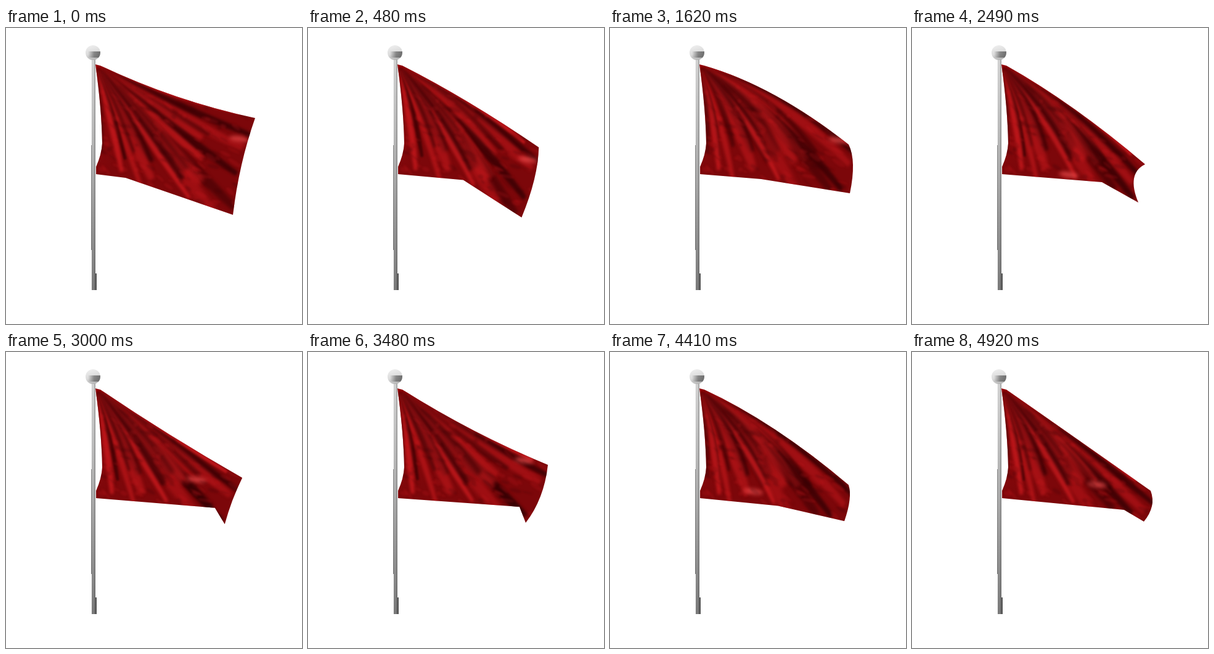
Animation of 480 by 480 pixels, one loop 4.95 s. Source, as an HTML page with a canvas:

```html
<!DOCTYPE html>
<html lang="en">
<head>
<meta charset="utf-8">
<title>Waving flag</title>
<style>
  html, body { margin: 0; width: 100%; height: 100%; overflow: hidden; background: #fff; }
  canvas { display: block; width: 480px; height: 480px; }
</style>
</head>
<body>
<canvas id="stage" width="480" height="480"></canvas>
<script>
const SIZE = 480, LOOP = 4950, STEP = 30;
const ctx = document.getElementById('stage').getContext('2d');

// The cloth hangs from two fixed points; each pose places its free corners.
const TOP = [145, 59], BOTTOM = [146, 237];
const poses = [];
const pose = (time, bow, tip, mid, foot, heel, glint) =>
  poses.push({ time, values: [bow, ...tip, ...mid, ...foot, ...heel, ...glint] });

pose(0, -8, [404, 146], [382, 222], [368, 303], [194, 243], [378, 180]);
pose(960, 18, [353, 224], [357, 262], [339, 308], [292, 246], [340, 234]);
pose(1620, 15, [387, 189], [394, 222], [389, 268], [245, 245], [370, 182]);
pose(2490, 9, [378, 221], [360, 244], [367, 283], [308, 250], [254, 238]);
pose(3480, -6, [389, 183], [377, 234], [353, 277], [343, 251], [350, 176]);
pose(3930, 15, [384, 203], [388, 236], [381, 273], [230, 243], [202, 230]);
pose(4920, 1, [387, 225], [389, 250], [376, 275], [344, 256], [300, 215]);

const mix = (a, b, k) => a + (b - a) * k;
const lerp = (p, q, k) => [mix(p[0], q[0], k), mix(p[1], q[1], k)];
const distance = (p, q) => Math.hypot(q[0] - p[0], q[1] - p[1]);

function random(seed) {
  return () => (seed = seed * 16807 % 2147483647) / 2147483647;
}

// Hermite blend of the poses, with a small flutter between them.
function shapeAt(t) {
  const at = k => poses[Math.max(0, Math.min(poses.length - 1, k))];
  let i = 0;
  while (i < poses.length - 2 && t >= poses[i + 1].time) i++;
  const p = at(i), q = at(i + 1), span = q.time - p.time;
  const w = Math.min(1, (t - p.time) / span), ease = w * w * (3 - 2 * w);
  const slope = (k, n) =>
    (at(k + 1).values[n] - at(k - 1).values[n]) / (at(k + 1).time - at(k - 1).time);
  const v = p.values.map((a, n) => mix(a, q.values[n], ease)
    + span * w * (1 - w) * (slope(i, n) * (1 - w) - slope(i + 1, n) * w)
    + 2 * Math.sin(Math.PI * w) * Math.sin(t / 130 - n));
  const point = n => [v[n], v[n + 1]];
  return { bow: v[0], tip: point(1), mid: point(3), foot: point(5), heel: point(7), glint: point(9) };
}

function clothPath({ bow, tip, mid, foot, heel }) {
  const path = new Path2D();
  const curve = (c, p) => path.quadraticCurveTo(...c, ...p);
  const crown = lerp(TOP, tip, .5), fly = lerp(tip, foot, .5);
  path.moveTo(...TOP);
  path.lineTo(TOP[0] + 8, TOP[1] + 2);
  curve([crown[0], crown[1] - 2 * bow], tip);
  curve([2 * mid[0] - fly[0], 2 * mid[1] - fly[1]], foot);
  path.lineTo(...heel);
  path.lineTo(...BOTTOM);
  path.lineTo(146, 225);
  curve([155, 205], [156, 187]);
  curve([155, 130], TOP);
  path.closePath();
  return path;
}

// Point a fraction s of the way round the free edge, from tip to hoist.
function rimPoint({ tip, mid, foot, heel }, s) {
  const rim = [tip, mid, foot, heel, BOTTOM];
  const legs = rim.slice(1).map((p, k) => distance(rim[k], p));
  let left = s * legs.reduce((a, b) => a + b), k = 0;
  while (k < legs.length - 1 && left > legs[k]) left -= legs[k++];
  return lerp(rim[k], rim[k + 1], left / legs[k]);
}

// A curved spindle, thin at its root.
function drawFold(from, to, width, bow, color) {
  const len = distance(from, to) || 1;
  const nx = (to[1] - from[1]) / len, ny = (from[0] - to[0]) / len;
  const left = [], right = [];
  for (let n = 0; n <= 12; n++) {
    const k = n / 12, [x, y] = lerp(from, to, k);
    const lift = 4 * bow * k * (1 - k);
    const half = width / 2 * Math.sin(Math.PI * (.06 + .74 * k));
    left.push([x + nx * (lift + half), y + ny * (lift + half)]);
    right.unshift([x + nx * (lift - half), y + ny * (lift - half)]);
  }
  ctx.fillStyle = color;
  ctx.beginPath();
  [...left, ...right].forEach(p => ctx.lineTo(...p));
  ctx.fill();
}

const light = a => `rgba(200,26,30,${a})`;
const dark = a => `rgba(48,0,3,${a})`;

// Creases fan out from the upper hoist, light and dark in turn, and sway.
function drawFolds(shape, t) {
  const rnd = random(4), count = 20;
  for (let n = 0; n < count; n++) {
    const sway = .02 * Math.sin(t / 400 + n);
    const s = Math.min(1, Math.max(0, (n + .5 * rnd()) / count + sway));
    const to = lerp(TOP, rimPoint(shape, s), .72 + .35 * rnd());
    const width = 8 + 16 * rnd(), alpha = .45 + .4 * rnd();
    ctx.filter = `blur(${1 + width / 10}px)`;
    drawFold(lerp(TOP, to, .05), to, width, shape.bow * (1 - s) + 3,
      n % 2 ? dark(alpha) : light(alpha));
  }
}

function drawGlint([x, y]) {
  ctx.filter = 'blur(3px)';
  ctx.fillStyle = 'rgba(235,75,75,.75)';
  ctx.beginPath();
  ctx.ellipse(x, y, 16, 4.5, .15, 0, 7);
  ctx.fill();
}

// Satin texture: soft mottling drawn along the weave.
function makeSatin() {
  const layer = document.createElement('canvas');
  layer.width = layer.height = SIZE;
  const c = layer.getContext('2d'), rnd = random(71);
  c.filter = 'blur(1.5px)';
  for (let k = 0; k < 150; k++) {
    c.fillStyle = (rnd() < .5 ? dark : light)(.2);
    c.beginPath();
    c.ellipse(150 + 250 * rnd(), 90 + 210 * rnd(), 3 + 9 * rnd(), 1 + 3 * rnd(), .2 + .7 * rnd(), 0, 7);
    c.fill();
  }
  return layer;
}
const satin = makeSatin();

function gradient(x0, y0, x1, y1, ...colors) {
  const g = ctx.createLinearGradient(x0, y0, x1, y1);
  colors.forEach((color, k) => g.addColorStop(k / (colors.length - 1), color));
  return g;
}

function drawPole() {
  const shaft = new Path2D('M139 48H145V398H147V425H139V360H138V190H139Z');
  ctx.fillStyle = gradient(138, 0, 146, 0, '#a0a0a0', '#dedede', '#c0c0c0', '#707070');
  ctx.fill(shaft);
  ctx.fillStyle = gradient(0, 50, 0, 425, 'rgba(50,50,50,0)', 'rgba(50,50,50,.25)', 'rgba(50,50,50,.55)');
  ctx.fill(shaft);

  ctx.save();
  ctx.beginPath();
  ctx.arc(141, 40, 12, 0, 7);
  ctx.clip();
  ctx.fillStyle = gradient(136, 28, 144, 53, '#eeeeee', '#dcdcdc', '#b0b0b0');
  ctx.fillRect(128, 27, 26, 26);
  ctx.fillStyle = gradient(133, 0, 153, 0, 'rgba(80,80,80,0)', 'rgba(80,80,80,.6)', 'rgba(80,80,80,.75)');
  ctx.filter = 'blur(.7px)';
  ctx.fillRect(132, 38, 24, 10);
  ctx.restore();
}

function draw(t) {
  const shape = shapeAt(t);
  ctx.fillStyle = '#fff';
  ctx.fillRect(0, 0, SIZE, SIZE);
  drawPole();

  ctx.save();
  ctx.clip(clothPath(shape));
  ctx.fillStyle = gradient(150, 60, 330, 290, '#98090d', '#7c070a', '#7c070a');
  ctx.fillRect(130, 40, 300, 290);
  drawFolds(shape, t);
  drawGlint(shape.glint);
  ctx.filter = 'none';
  ctx.drawImage(satin, 0, 0);
  ctx.restore();
}

const start = performance.now();
let shown = -1;
function tick() {
  const now = Math.max(0, performance.now() - start) % LOOP;
  const t = now < 2 * STEP ? 0 : Math.floor(now / STEP) * STEP;
  if (t !== shown) draw(shown = t);
  requestAnimationFrame(tick);
}
tick();
</script>
</body>
</html>
```
